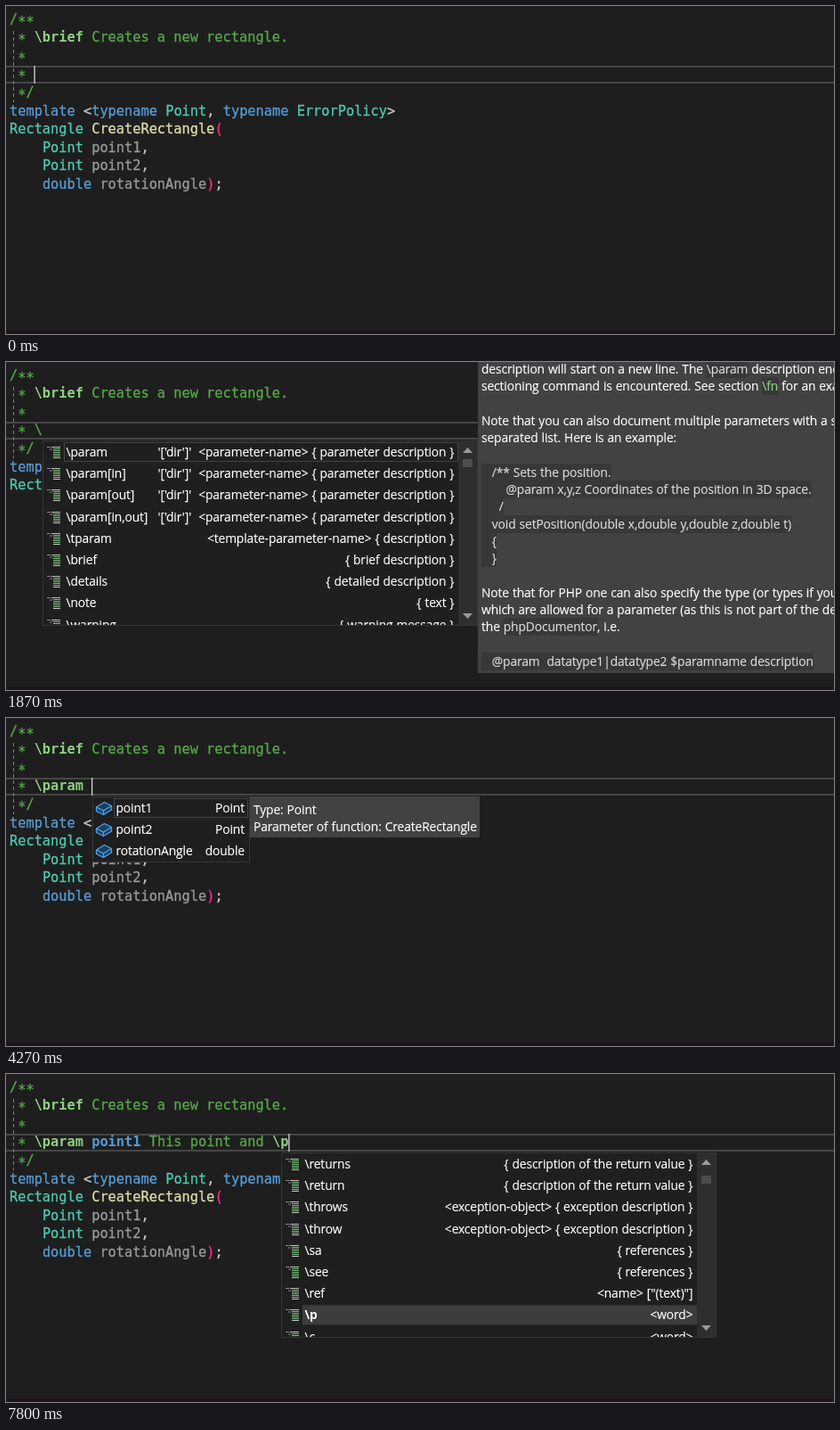
These frames come from a looping animation (930 px wide and 368 px high, 8 s). An HTML page:

```html
<!DOCTYPE html>
<html lang="en">
<head>
<meta charset="utf-8">
<title>Doc comment completion</title>
<style>
html, body { margin: 0; width: 100%; height: 100%; overflow: hidden; background: #1e1e1e; }
svg { display: block; width: 930px; height: 368px; }
text { white-space: pre; }
.code { font: 15.3px "DejaVu Sans Mono", "Noto Sans Mono", monospace; stroke-width: .3; }
.ui { font: 13.8px "Open Sans", "Noto Sans", sans-serif; letter-spacing: -.1px; word-spacing: .45px; stroke-width: .15; }
.b { font-weight: 700; stroke-width: 0; }
</style>
</head>
<body>
<svg id="stage" viewBox="0 0 930 368" xmlns="http://www.w3.org/2000/svg"></svg>
<script>
const LOOP = 8000, CH = 9.22, LEFT = 4, LINE = 20.55, ROW = 24.2;
const C = {
  doc: '#57a64a', cmd: '#8ed182', key: '#569cd6', type: '#4ec9b0', fn: '#dcdcaa',
  arg: '#9a9a9a', punc: '#c8c8c8', brace: '#ff2d8c', ui: '#fff', mark: '#0e4583'
};
const stage = document.getElementById('stage');

function el(parent, tag, attrs, content) {
  const node = document.createElementNS('http://www.w3.org/2000/svg', tag);
  for (const k in attrs) node.setAttribute(k, attrs[k]);
  if (content !== undefined) node.textContent = content;
  parent.appendChild(node);
  return node;
}
const group = (parent = stage, attrs = {}) => el(parent, 'g', attrs);
const rect = (parent, x, y, width, height, fill, more = {}) =>
  el(parent, 'rect', { x, y, width, height, fill, ...more });
const path = (parent, d, stroke, more = {}) =>
  el(parent, 'path', { d, stroke, fill: 'none', ...more });
const show = (node, on) => node.setAttribute('visibility', on ? 'visible' : 'hidden');
const colX = col => LEFT + col * CH;
const baseY = row => Math.round(19.8 + row * LINE);

function code(parent, row, col, str, fill, bold) {
  return el(parent, 'text', { x: colX(col), y: baseY(row), fill, stroke: fill, class: bold ? 'code b' : 'code' }, str);
}
// Stars sit at mid height, below the font's own position
function star(parent, row, col) {
  code(parent, row, col, '*', C.doc).setAttribute('dy', 3);
}
function ui(parent, x, y, str, more = {}) {
  const fill = more.fill || C.ui;
  return el(parent, 'text', { x, y, fill, stroke: fill, class: 'ui', ...more }, str);
}

// Editor
rect(stage, 0, 0, 930, 368, '#1e1e1e');
rect(stage, 0, 364, 930, 4, '#1b1418');
rect(stage, 0, 67, 930, 2, '#464646');
rect(stage, 0, 85, 930, 2, '#464646');
path(stage, 'M8.5 28V108', '#7c7c7c', { 'stroke-dasharray': '4 3' });

const marks = {
  point1: group(), a: group()
};
const mark = (parent, row, col, len) =>
  rect(parent, colX(col), baseY(row) - 15, len * CH, 20, C.mark);
mark(marks.point1, 3, 10, 6);
mark(marks.point1, 7, 10, 6);
mark(marks.a, 1, 18, 1);
mark(marks.a, 3, 28, 1);

code(stage, 0, 0, '/', C.doc);
[[0, 1], [0, 2], [1, 1], [2, 1], [3, 1], [4, 1]].forEach(([r, c]) => star(stage, r, c));
code(stage, 4, 2, '/', C.doc);
code(stage, 1, 3, '\\brief', C.cmd, true);
code(stage, 1, 10, 'Creates a new rectangle.', C.doc);
[
  [5, 0, 'template', C.key], [5, 9, '<', C.punc], [5, 10, 'typename', C.key],
  [5, 19, 'Point', C.type], [5, 24, ',', C.punc], [5, 26, 'typename', C.key],
  [5, 35, 'ErrorPolicy', C.type], [5, 46, '>', C.punc],
  [6, 0, 'Rectangle', C.type], [6, 10, 'CreateRectangle', C.fn], [6, 25, '(', C.brace],
  [7, 4, 'Point', C.type], [7, 10, 'point1', C.arg], [7, 16, ',', C.punc],
  [8, 4, 'Point', C.type], [8, 10, 'point2', C.arg], [8, 16, ',', C.punc],
  [9, 4, 'double', C.key], [9, 11, 'rotationAngle', C.arg], [9, 24, ')', C.brace], [9, 25, ';', C.punc]
].forEach(a => code(stage, ...a));

const typed = {
  slash: code(stage, 3, 3, '\\', C.doc),
  param: code(stage, 3, 3, '\\param', C.cmd, true),
  name: code(stage, 3, 10, 'point1', C.key, true),
  prose: code(stage, 3, 17, '', C.doc),
  slash2: code(stage, 3, 32, '\\', C.doc),
  word: code(stage, 3, 32, '\\p', C.cmd, true)
};
const caret = rect(stage, 0, 67, 1.25, 20, '#dcdcdc');

// Completion lists
function listIcon(parent, y) {
  path(parent, `M5 ${y - 6}h4M8 ${y - 3.5}h3`, '#8a8a8a');
  path(parent, `M10 ${y - 6}h10M12 ${y + 6}h8`, '#c4c4c4');
  path(parent, [-4, -2, 0, 2, 4].map(d => `M12 ${y + d}h8`).join(''), '#7cc47c', { 'stroke-width': 1.2 });
}
function cubeIcon(parent, y) {
  const g = group(parent, { transform: `translate(4 ${y - 8})` });
  path(g, 'M.5 7 9.5 1.5 17.5 5.5V10L8.5 15.5 .5 11.5Z', '#4aa3ee', { fill: '#1d3f5e', 'stroke-width': 1.3, 'stroke-linejoin': 'round' });
  path(g, 'M.5 7 8.5 11 17.5 5.5M8.5 11V15.5', '#4aa3ee', { 'stroke-width': 1.3 });
}
const clip = el(el(stage, 'defs', {}), 'clipPath', { id: 'list' });
rect(clip, 0, 0, 489, 207);

function bigList(x, rows, picked, filled, thumb) {
  const g = group(stage, { transform: `translate(${x} 88)` });
  rect(g, .5, .5, 488, 207, '#1f1f1f', { stroke: '#343434' });
  const body = group(g, { 'clip-path': 'url(#list)' });
  const top = 2 + picked * ROW;
  rect(body, 24.5, top + .5, 442, 21, filled ? '#3d3d3d' : 'none', { stroke: filled ? '#3d3d3d' : '#424242' });
  rows.forEach(([name, info, dir], i) => {
    const y = 18 + i * ROW;
    listIcon(body, Math.round(y - 5) + .5);
    ui(body, 26.5, y, '\\' + name, filled && i === picked ? { class: 'ui b' } : {});
    if (dir) ui(body, 129.5, y, "'['dir']'");
    ui(body, 462.5, y, info, { 'text-anchor': 'end' });
  });
  rect(g, 467, 1, 21, 206, '#2e2e2e');
  rect(g, 472, thumb, 11, 9, '#4d4d4d');
  el(g, 'path', { d: 'M472 14l5.5-6 5.5 6zM472 194l5.5 6 5.5-6z', fill: '#999' });
  return g;
}
const paramInfo = '<parameter-name> { parameter description }';
const commands = [
  ['param', paramInfo, 1], ['param[in]', paramInfo, 1], ['param[out]', paramInfo, 1],
  ['param[in,out]', paramInfo, 1], ['tparam', '<template-parameter-name> { description }'],
  ['brief', '{ brief description }'], ['details', '{ detailed description }'],
  ['note', '{ text }'], ['warning', '{ warning message }']
];
const moreCommands = [
  ['returns', '{ description of the return value }'], ['return', '{ description of the return value }'],
  ['throws', '<exception-object> { exception description }'],
  ['throw', '<exception-object> { exception description }'],
  ['sa', '{ references }'], ['see', '{ references }'], ['ref', '<name> ["(text)"]'],
  ['p', '<word>'], ['c', '<word>']
];
const lists = {
  first: bigList(41, commands, 0, false, 21),
  again: bigList(309, commands, 0, false, 21),
  word: bigList(309, moreCommands, 7, true, 26),
  args: group(stage, { transform: 'translate(97 88)' })
};
rect(lists.args, .5, .5, 176, 73, '#1f1f1f', { stroke: '#383838' });
rect(lists.args, 24.5, 2.5, 150, 21, 'none', { stroke: '#424242' });
[['point1', 'Point'], ['point2', 'Point'], ['rotationAngle', 'double']].forEach(([name, type], i) => {
  const y = 18 + i * ROW;
  cubeIcon(lists.args, Math.round(y - 5));
  ui(lists.args, 26.5, y, name);
  ui(lists.args, 171, y, type, { 'text-anchor': 'end' });
});

// Tooltips; each part is [text, colour, shaded]
const tips = { help: group(), arg: group() };
rect(tips.help, 530, 0, 400, 349, '#424242');
const pale = '#dcdcdc';
const snippet = s => [[s, pale, true]];
[
  [13, [['description will start on a new line. The '], ['\\param', pale, true], [' description ends when']]],
  [32, [['sectioning command is encountered. See section '], ['\\fn', '#8fd08a', true], [' for an example.']]],
  [71, [['Note that you can also document multiple parameters with a single']]],
  [90, [['separated list. Here is an example:']]],
  [129, snippet('   /** Sets the position.')],
  [148, snippet('       @param x,y,z Coordinates of the position in 3D space.')],
  [167, snippet('     /')],
  [187, snippet('   void setPosition(double x,double y,double z,double t)')],
  [206, snippet('   {')],
  [225, snippet('   }')],
  [264, [['Note that for PHP one can also specify the type (or types if you separate']]],
  [283, [['which are allowed for a parameter (as this is not part of the definition']]],
  [302, [['the '], ['phpDocumentor', pale, true], [', i.e.']]],
  [341, snippet('   @param  datatype1|datatype2 $paramname description')]
].forEach(([y, parts]) => {
  let x = 534;
  for (const [str, fill = C.ui, shaded] of parts) {
    const back = shaded && rect(tips.help, x, y - 15, 0, 20, '#383838');
    const w = ui(tips.help, x, y, str, { fill }).getComputedTextLength();
    if (back) back.setAttribute('width', w);
    x += w;
  }
});
rect(tips.arg, 274, 88, 258, 46, '#424242');
ui(tips.arg, 278, 107.5, 'Type: Point');
ui(tips.arg, 278, 126.5, 'Parameter of function: CreateRectangle');

// Timeline
const PROSE = 'This point and ';
const keys = [5870, 5930, 6000, 6130, 6200, 6330, 6530, 6600, 6670, 6730, 6800, 6930, 7070, 7130, 7270];
const moves = [[0, 3], [1270, 4], [2400, 9], [3270, 10], [5400, 16], [5670, 17],
  ...keys.map((k, i) => [k, 18 + i]), [7530, 33], [7800, 34]];
const blinks = [[330, 870], [1870, 2400], [2930, 3270], [3730, 4270], [4800, 5330]];

function fade(node, t, from, to) {
  const step = Math.floor((t - from) / 68) + 1;
  show(node, t >= from && t < to);
  node.setAttribute('opacity', Math.max(0, Math.min(1, step / 3)));
}

function draw(t) {
  const within = (a, b = LOOP) => t >= a && t < b;
  show(typed.slash, within(1270, 2400));
  show(typed.param, within(2400));
  show(typed.name, within(5400));
  typed.prose.textContent = PROSE.slice(0, keys.filter(k => k <= t).length);
  show(typed.slash2, within(7530, 7800));
  show(typed.word, within(7800));
  show(marks.point1, within(5400, 5670));
  show(marks.a, within(6930, 7070));

  show(lists.first, within(1270, 2400));
  show(lists.args, within(3270, 5400));
  show(lists.again, within(7670, 7800));
  show(lists.word, within(7800));
  fade(tips.help, t, 1730, 2400);
  fade(tips.arg, t, 3730, 5400);

  const col = moves.filter(m => m[0] <= t).pop()[1];
  caret.setAttribute('x', colX(col) - .2);
  show(caret, !blinks.some(([a, b]) => within(a, b)));
}

const start = performance.now();
function tick() {
  draw((performance.now() - start) % LOOP);
  requestAnimationFrame(tick);
}
draw(0);
requestAnimationFrame(tick);
</script>
</body>
</html>
```
